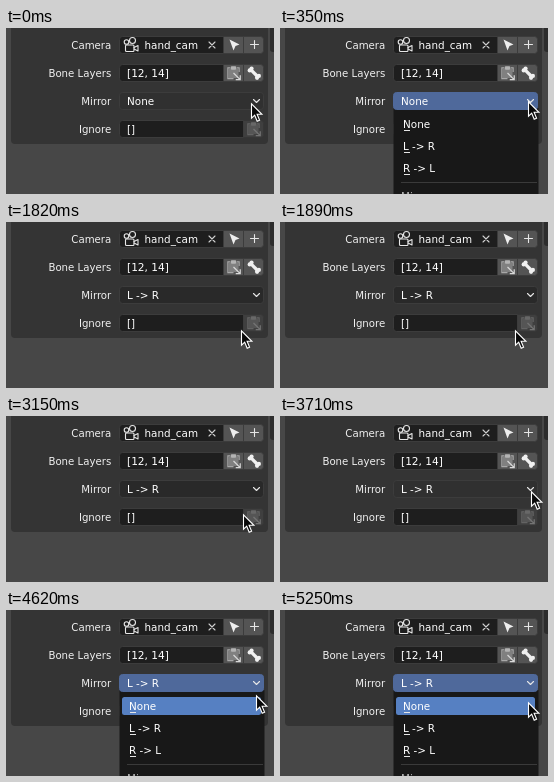
Recreate the animation shown at these times as an HTML page. Size 268 by 166 pixels, loop 5320 ms.

```html
<!DOCTYPE html>
<html lang="en">
<head>
<meta charset="utf-8">
<title>Mirror menu</title>
<style>
  html, body { margin: 0; width: 100%; height: 100%; overflow: hidden; background: #474747; }
  svg { display: block; width: 268px; height: 166px; }
  text { font: 10.4px "DejaVu Sans", sans-serif; fill: #fff; white-space: pre; }
  .label { font-size: 10.2px; text-anchor: end; fill: #f0f0f0; }
  .field { fill: #1e1e1e; stroke: #3c3c3c; }
  .button { fill: #545454; stroke: #3c3c3c; }
  .line { fill: none; stroke: #e6e6e6; stroke-width: 1.1; stroke-linecap: round; stroke-linejoin: round; }
  .off { opacity: .35; }
</style>
</head>
<body>
<svg viewBox="0 0 268 166">
  <defs>
    <g id="paste" transform="scale(1.12)">
      <path d="M-3 -4.5H-5V5H0M3 -4.5H5V-1" fill="none" stroke="#aaa" stroke-width="1.1"/>
      <rect x="-4.5" y="-4" width="9" height="8.500" fill="#808080"/>
      <rect x="-2.500" y="-6" width="5" height="3" rx="1" fill="#b4b4b4"/>
      <path d="M0 0L5.500 5.500M6 2V6H2" fill="none" stroke="#d8d8d8" stroke-width="1.1"/>
    </g>
  </defs>

  <rect width="268" height="166" fill="#474747"/>
  <rect x="5" y="-6" width="257" height="122" rx="4" fill="#343434"/>
  <rect x="264" y="-6" width="8" height="30" rx="3" fill="#2c2c2c"/>

  <text class="label" x="105.300" y="21">Camera</text>
  <text class="label" x="105.300" y="49">Bone Layers</text>
  <text class="label" x="105.300" y="77">Mirror</text>
  <text class="label" x="105.300" y="105">Ignore</text>

  <rect class="button" x="200.5" y="8.5" width="57" height="17" rx="3"/>
  <path class="field" d="M116.500 8.500H217.500V25.500H116.500a3 3 0 0 1-3-3v-11a3 3 0 0 1 3-3z"/>
  <path d="M237.500 9V25" stroke="#3c3c3c"/>
  <g class="line">
    <circle cx="120.500" cy="14" r="2.300"/>
    <circle cx="126.500" cy="12.500" r="3"/>
    <rect x="119.500" y="17" width="8.500" height="6.500" rx="1"/>
    <path d="M128 19.500L132 17.500V23L128 21"/>
    <path d="M203 14L209 20M209 14L203 20" stroke="#d0d0d0"/>
  </g>
  <text x="138.500" y="21">hand_cam</text>
  <path d="M223.500 11.500L233.500 16.500L229.500 18L227.500 22.500Z" fill="#eee"/>
  <path class="line" d="M244.500 16.500H252.500M248.500 12.500V20.500"/>

  <rect class="button" x="200.5" y="36.5" width="57" height="17" rx="3"/>
  <path class="field" d="M116.500 36.500H217.500V53.500H116.500a3 3 0 0 1-3-3v-11a3 3 0 0 1 3-3z"/>
  <path d="M237.500 37V53" stroke="#3c3c3c"/>
  <text x="121" y="49" style="font-size:10.6px">[12, 14]</text>
  <use href="#paste" x="227.500" y="45"/>
  <g fill="#f0f0f0" transform="translate(248.300 45.200) scale(1.1)">
    <path d="M-3 -3L3 3" stroke="#f0f0f0" stroke-width="3"/>
    <circle cx="-2.500" cy="-4.200" r="1.900"/><circle cx="-4.200" cy="-2.500" r="1.900"/>
    <circle cx="4.200" cy="2.500" r="1.900"/><circle cx="2.500" cy="4.200" r="1.900"/>
  </g>

  <rect class="button off" x="200.5" y="92.5" width="57" height="17" rx="3"/>
  <path class="field" d="M116.500 92.500H237.500V109.500H116.500a3 3 0 0 1-3-3v-11a3 3 0 0 1 3-3z"/>
  <text x="121" y="105">[]</text>
  <use class="off" href="#paste" x="247.500" y="101"/>

  <g id="menu">
    <path d="M113.500 80H258.500V166H113.500Z" fill="#181818"/>
    <rect id="bar" x="116" width="139" height="18" rx="2.500" fill="#5680c2"/>
    <g id="items"></g>
    <path d="M121 154.500H257" stroke="#3a3a3a"/>
    <text x="121" y="172" style="fill:#b0b0b0">Mirror</text>
  </g>

  <rect id="drop" x="113.5" y="64.5" width="144" height="17" rx="3"/>
  <text id="value" x="121" y="77"></text>
  <path class="line" d="M247.500 71.500L250.500 74.500L253.500 71.500"/>

  <path id="cursor" d="M.500 .900V15.200L3.700 12.200L6.200 18.300L8.600 17.300L6.100 11.300H10.900Z"
        fill="#080808" stroke="#fff" stroke-width="1.1"/>
</svg>

<script>
const LOOP = 5320, STEP = 70;
const $ = id => document.getElementById(id);

// time, x, y of the pointer tip
const path = [
  [0, 245, 75], [350, 248, 73], [770, 248, 73],
  [840, 248, 74], [910, 246, 82], [980, 242, 92], [1050, 238, 101], [1120, 236, 106], [1190, 235, 108],
  [3080, 235, 108], [3150, 237, 98], [3220, 241, 91], [3290, 244, 85], [3360, 247, 80],
  [3500, 250, 76], [3640, 251, 75], [3850, 251, 74],
  [4410, 251, 74], [4480, 251, 76], [4620, 250, 85], [4760, 248, 92], [LOOP, 248, 92]
];

["None", "L -> R", "R -> L"].forEach((name, i) => {
  const y = 100 + 22 * i;
  $("items").innerHTML += `<text x="123" y="${y}">${name}</text>` +
    `<path d="M124 ${y + 2.5}h6" stroke="#e6e6e6"/>`;
});

function pointer(t) {
  const i = path.findIndex(k => k[0] > t);
  const [t0, x0, y0] = path[i - 1], [t1, x1, y1] = path[i];
  const p = (t - t0) / (t1 - t0);
  return [x0 + (x1 - x0) * p, y0 + (y1 - y0) * p];
}

function draw(now) {
  const t = Math.floor(now % LOOP / STEP) * STEP;
  const [x, y] = pointer(t);
  const open = t >= 140 && t < 1820 || t >= 4060;
  const hover = y >= 64 && y < 82;
  const row = Math.floor((y - 85) / 22);

  $("cursor").setAttribute("transform", `translate(${Math.round(x)} ${Math.round(y)})`);
  $("menu").style.display = open ? "" : "none";
  $("bar").style.display = row >= 0 ? "" : "none";
  $("bar").setAttribute("y", 87 + 22 * Math.max(row, 0));
  $("drop").setAttribute("fill", open ? "#4f699b" : hover ? "#303030" : "#292929");
  $("drop").setAttribute("stroke", open ? "#4f699b" : "#3c3c3c");
  $("value").textContent = t < 1820 ? "None" : "L -> R";
}

function tick() {
  draw(performance.now());
  requestAnimationFrame(tick);
}
tick();
</script>
</body>
</html>
```
